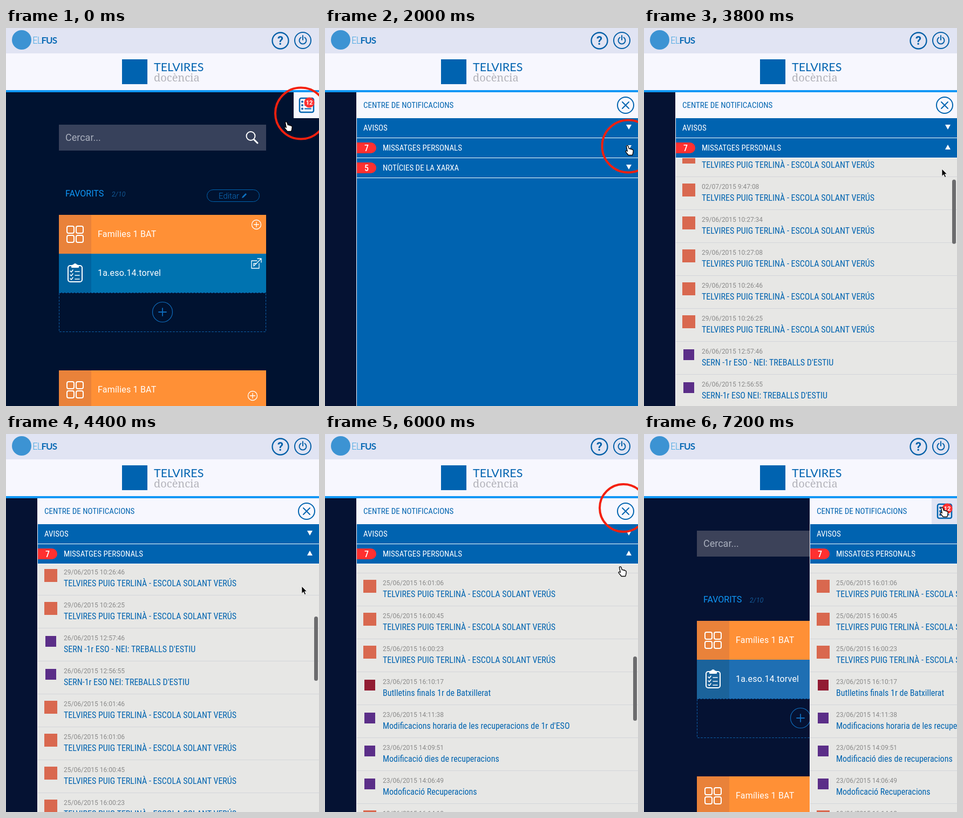
An HTML page that plays this animation: 580x700 px, repeating every 7.4 s.

```html
<!DOCTYPE html>
<html lang="ca">
<head>
<meta charset="utf-8">
<title>Centre de notificacions</title>
<style>
  html, body { margin: 0; width: 100%; height: 100%; overflow: hidden; background: #001230; }
  svg { display: block; font: 16px Roboto, sans-serif; }
  .line { fill: none; stroke-linecap: round; stroke-linejoin: round; }
  .white { stroke: #fff; }
  .blue { stroke: #0064b0; }
  .narrow { font-family: "Roboto Condensed", Roboto, sans-serif; font-stretch: 75%; }
  .heading { font-size: 15px; }
  .count { font-size: 16px; font-weight: 500; text-anchor: middle; }
  .date { font-size: 12px; fill: #8a8a8a; }
  .mid { text-anchor: middle; }
</style>
</head>
<body>
<svg width="580" height="700" viewBox="0 0 580 700">
  <defs>
    <g id="grid" class="line white" stroke-width="2">
      <rect x="15" y="21" width="13" height="13" rx="3"/>
      <rect x="32" y="21" width="13" height="13" rx="3"/>
      <rect x="15" y="38" width="13" height="13" rx="3"/>
      <rect x="32" y="38" width="13" height="13" rx="3"/>
    </g>
    <g id="family">
      <rect width="384" height="72" fill="#ff9036"/>
      <rect width="60" height="72" fill="#e9823a"/>
      <use href="#grid"/>
      <text x="72" y="41" fill="#fff" letter-spacing=".2">Famílies 1 BAT</text>
    </g>
    <g id="plus" class="line white" stroke-width="1.3">
      <circle r="8.5"/><path d="M-4.500 0h9M0-4.500v9"/>
    </g>
    <path id="down" d="M499-4h10l-5 9z" fill="#fff"/>
    <path id="up" d="M499 4h10l-5-9z" fill="#fff"/>
    <clipPath id="listClip"><rect id="listBox" y="241" width="522"/></clipPath>
  </defs>

  <g id="page">
    <rect id="backdrop" width="580" height="700"/>
    <rect id="search" x="98" y="179" width="384" height="48"/>
    <text x="110" y="209" font-size="18" fill="#a9afbd">Cercar...</text>
    <g class="line white" stroke-width="2">
      <circle cx="453.500" cy="200" r="8"/><path d="M460 207l6 6" stroke-width="3"/>
    </g>

    <text x="110" y="312" fill="#0f97f6">FAVORITS</text>
    <text x="196" y="312" font-size="12" font-style="italic" font-weight="300" fill="#1a78c2" letter-spacing=".4">2/10</text>
    <rect x="372.500" y="299.500" width="97" height="22" rx="11" class="line blue"/>
    <text x="394" y="316" font-size="15" font-weight="300" fill="#0d70c0">Editar</text>
    <path d="M437 315l1-3 6-6 2 2-6 6z" fill="#0d70c0"/>

    <use href="#family" x="98" y="346"/>
    <use href="#plus" x="464" y="364"/>
    <g transform="translate(98 418)">
      <rect id="tile" width="384" height="72"/>
      <rect id="tileIcon" width="60" height="72"/>
      <g class="line white" stroke-width="2">
        <rect x="17" y="22" width="26" height="30" rx="4"/>
        <path d="M24 22v3h12v-3l-3-1q-3-4-6 0z" fill="#fff"/>
        <path d="M21 32l2 2 3-4M21 39l2 2 3-4M21 46l2 2 3-4M30 33h8M30 40h8M30 47h8" stroke-width="1.600"/>
      </g>
      <text x="72" y="41" fill="#fff" letter-spacing=".2">1a.eso.14.torvel</text>
      <path d="M367 13h-10v14h14v-9M361 23v-5h4M362 22l13-13M368 9h7v7" class="line white" stroke-width="1.300"/>
    </g>
    <rect x="98.500" y="490.500" width="383" height="72" class="line" stroke="#0d5ea6" stroke-dasharray="3 3" stroke-linecap="butt"/>
    <g class="line" stroke="#0f6dbd" stroke-width="1.200">
      <circle cx="290" cy="526" r="18.500"/><path d="M283 526h14M290 519v14" stroke-width="1.800"/>
    </g>
    <use href="#family" x="98" y="634"/>
    <use href="#plus" x="457" y="681"/>
    <rect id="shade" x="290" y="346" width="8" height="144" opacity=".18"/>
  </g>

  <g id="panel">
    <path d="M-1 119h523v581h-523z" fill="#f7f7fe"/>
    <path d="M0 167h523v533h-523z" fill="#0063b0"/>
    <g class="narrow heading" fill="#fff">
      <text x="12" y="148" fill="#0064b0">CENTRE DE NOTIFICACIONS</text>
      <text x="12" y="190">AVISOS</text>
      <use href="#down" y="183"/>
      <path d="M0 203h522v1h-522zM0 240h522v1h-522z"/>
      <path d="M0 212h26a10 10 0 0 1 0 20h-26z" fill="#ff3030"/>
      <text x="18" y="227.500" class="count">7</text>
      <text x="48" y="227">MISSATGES PERSONALS</text>
      <use id="arrow" y="221"/>
      <g id="news">
        <path d="M0 249h26a10 10 0 0 1 0 20h-26z" fill="#ff3030"/>
        <text x="18" y="264.500" class="count">5</text>
        <text x="48" y="264">NOTÍCIES DE LA XARXA</text>
        <use href="#down" y="257"/>
        <path d="M0 277h522v1h-522z"/>
      </g>
    </g>
    <g clip-path="url(#listClip)">
      <rect y="241" width="522" height="459" fill="#e7e7e5"/>
      <g id="items"></g>
      <rect id="thumb" x="512" width="7" height="119" rx="3.500" fill="#6c6c6e"/>
    </g>
  </g>

  <g id="button">
    <rect id="buttonBack" x="533" y="119" width="47" height="48"/>
    <g id="closeIcon" class="line blue" stroke-width="2">
      <circle cx="557" cy="143" r="15"/><path d="M551 137l12 12M563 137l-12 12"/>
    </g>
    <g id="listIcon">
      <rect x="544" y="130" width="26" height="26" rx="3" class="line blue" stroke-width="2.500"/>
      <path d="M549 136.500h.1M549 143h.1M549 149.500h.1" class="line blue" stroke-width="4"/>
      <path d="M554 136.500h11M554 143h11M554 149.500h11" class="line blue" stroke-width="2"/>
      <circle cx="562" cy="138" r="9.500" fill="#ff3030"/>
      <text x="562" y="142" class="mid" font-size="11" font-weight="700" fill="#fff">12</text>
    </g>
  </g>

  <rect width="580" height="47" fill="#e1e4f3"/>
  <rect y="47" width="580" height="68" fill="#f7f7fe"/>
  <rect y="115" width="580" height="4" fill="#0f97f6"/>
  <circle cx="29" cy="22" r="18" fill="#3c93d3"/>
  <text x="49" y="29" font-size="17" letter-spacing="-1" font-family="Lato, sans-serif" fill="#0b6bb5"><tspan font-weight="300" fill="#2a9be0">EL</tspan><tspan font-weight="700">FUS</tspan></text>
  <g class="line" stroke="#0560a8" stroke-width="2.300">
    <circle cx="508.500" cy="23.500" r="15"/>
    <circle cx="550" cy="23" r="15" stroke-width="2"/>
    <path d="M546.500 17.500a6.500 6.500 0 1 0 7 0M550 14v8" stroke-width="2"/>
  </g>
  <text x="508.500" y="31" class="mid" font-size="22" font-weight="700" fill="#0560a8">?</text>
  <rect x="215" y="58" width="47" height="46" fill="#0063b0"/>
  <text x="274" y="80" font-size="21.500" font-family="Lato, sans-serif" fill="#0063b0">TELVIRES</text>
  <text x="274" y="99" font-size="20" font-weight="300" font-family="Noto Serif, serif" fill="#b3b3ba">docència</text>

  <circle id="ring" class="line" stroke="#f4200e" stroke-width="4"/>
  <g id="cursor" stroke="#000" stroke-width="1.200" stroke-linejoin="round" fill="#fff">
    <path id="hand" transform="scale(1.12)" d="M-5-6.500q1.500-2 3 0l1.500 4.500q1.500-1 2.500.5q1.500-.8 2.300.7q2-.3 2.200 2l-.5 4-1 3.300h-6.500l-4.500-5.500q-.8-2 1.500-1.700l1.200.8z"/>
    <path id="pointer" d="M-4-8v13.500l3.200-3 2.200 5 2.300-1-2.200-4.800h4z" fill="#000" stroke="#fff" stroke-width=".8"/>
  </g>
</svg>
<script>
const LOOP = 7400, STEP = 200, ROW = 61;
const $ = id => document.getElementById(id);
const set = (id, attrs) => { for (const name in attrs) $(id).setAttribute(name, attrs[name]); };
const show = (id, on) => set(id, { visibility: on ? 'visible' : 'hidden' });
const move = (id, x, y) => set(id, { transform: `translate(${x} ${y})` });

const SCHOOL = 'TELVIRES PUIG TERLINÀ - ESCOLA SOLANT VERÚS';
const RED = '#d9684f', PURPLE = '#5b2e88', WINE = '#921c33';
const days = [
  ['02/07/2015', ['9:48:09', '9:47:48', '9:47:29', '9:47:08']],
  ['29/06/2015', ['10:27:34', '10:27:08', '10:26:46', '10:26:25']],
  ['26/06/2015', ['12:57:46', '12:56:55']],
  ['25/06/2015', ['16:01:46', '16:01:06', '16:00:45', '16:00:23']],
  ['23/06/2015', ['16:10:17', '14:11:38', '14:09:51', '14:06:49']],
  ['19/06/2015', ['16:14:18']]
];
const special = {
  8: ["SERN -1r ESO - NEI: TREBALLS D'ESTIU", PURPLE],
  9: ["SERN-1r ESO NEI: TREBALLS D'ESTIU", PURPLE],
  14: ['Butlletins finals 1r de Batxillerat', WINE],
  15: ["Modificacions horaria de les recuperacions de 1r d'ESO", PURPLE],
  16: ['Modificació dies de recuperacions', PURPLE],
  17: ['Modoficació Recuperacions', PURPLE]
};
const stamps = days.flatMap(([day, times]) => times.map(time => `${day} ${time}`));
$('items').innerHTML = stamps.map((stamp, i) => {
  const [title, color] = special[i] || [SCHOOL, RED];
  const inset = color === RED ? 0 : 2;
  return `<g transform="translate(0 ${241 + i * ROW})">
    <rect x="${12 + inset}" y="${12 + inset}" width="${24 - 2 * inset}" height="${24 - 2 * inset}" fill="${color}"/>
    <text x="48" y="22" class="date">${stamp}</text>
    <text x="48" y="44" class="narrow" fill="#0064b0">${title}</text>
    <rect y="60" width="522" height="1" fill="#d3d5d9"/></g>`;
}).join('');

// Keys are [step, ...values], with straight lines between them.
const panelKeys = [[3, 580], [4, 566], [5, 486], [6, 356], [7, 215], [8, 105], [9, 58], [33, 58], [34, 81], [35, 172], [36, 307]];
const scrollKeys = [[17, 0], [22, 369], [26, 498], [29, 654]];
const cursorKeys = [[0, 523, 182], [3, 549, 160], [6, 549, 166], [7, 550, 168], [10, 564, 226], [17, 564, 226],
  [20, 552, 290], [24, 552, 290], [26, 551, 292], [28, 551, 292], [30, 551, 254], [33, 556, 144]];
// Each ring is [first step, last step, cx, cy, r].
const rings = [[0, 3, 546.5, 158, 47.5], [10, 14, 562, 219, 48.5], [29, 29, 553, 137, 50.5], [30, 33, 553, 137, 44]];

function valueAt(keys, step) {
  const next = keys.findIndex(key => key[0] >= step);
  if (next === 0) return keys[0].slice(1);
  if (next < 0) return keys[keys.length - 1].slice(1);
  const a = keys[next - 1], b = keys[next], p = (step - a[0]) / (b[0] - a[0]);
  return a.slice(1).map((v, i) => Math.round(v + (b[i + 1] - v) * p));
}

function draw(step) {
  const [left] = valueAt(panelKeys, step);
  const [scroll] = valueAt(scrollKeys, step);
  const isOpen = step >= 4, isClosing = step >= 34;
  const isHover = (step >= 3 && step <= 7) || step >= 33;
  const listHeight = step < 13 ? 0 : step === 13 ? 260 : 459;

  set('backdrop', { fill: isOpen ? '#051233' : '#001230' });
  set('search', { fill: isOpen ? '#3c4259' : '#37415b' });
  set('tile', { fill: isOpen ? '#1f6fb3' : '#0073b0' });
  set('tileIcon', { fill: isOpen ? '#1b639b' : '#00639f' });
  show('shade', step === 6);

  move('panel', left + 1, 0);
  show('panel', left < 580);
  set('listBox', { height: listHeight });
  move('news', 0, listHeight);
  set('arrow', { href: listHeight ? '#up' : '#down' });
  move('items', 0, -scroll);
  set('thumb', { y: 242.5 + scroll * .259 });
  show('thumb', step >= 18 && step < 34);

  set('buttonBack', { fill: isHover ? '#e1e4f3' : '#f7f7fe' });
  show('closeIcon', isOpen && !isClosing);
  show('listIcon', !isOpen || isClosing);

  const ring = rings.find(([from, to]) => step >= from && step <= to);
  show('ring', ring);
  if (ring) set('ring', { cx: ring[2], cy: ring[3], r: ring[4] });

  const isArrow = step >= 18 && step <= 24;
  move('cursor', ...valueAt(cursorKeys, step));
  show('hand', !isArrow);
  show('pointer', isArrow);
}

function tick() {
  draw(Math.floor(performance.now() % LOOP / STEP));
  requestAnimationFrame(tick);
}
tick();
</script>
</body>
</html>
```
